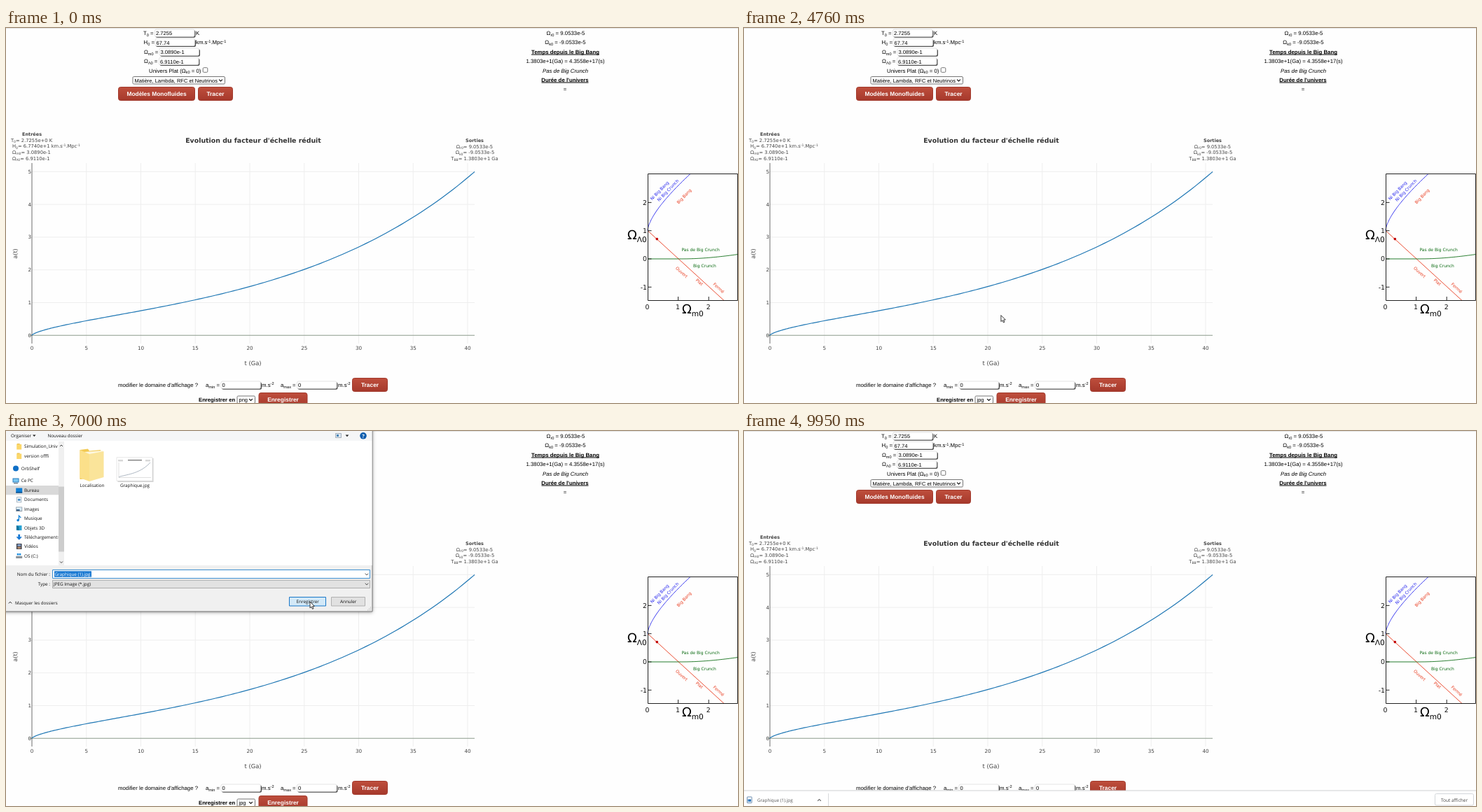
Recreate the animation shown at these times as an HTML page with a canvas. Size 1045 px wide and 536 px high, loop 9.99 s.

```html
<!DOCTYPE html>
<html lang="fr">
<head>
<meta charset="utf-8">
<title>Facteur d'échelle</title>
<style>
html, body { margin: 0; width: 100%; height: 100%; overflow: hidden; background: #fefefe; }
canvas { display: block; width: 1045px; height: 536px; }
</style>
</head>
<body>
<canvas id="stage" width="1045" height="536"></canvas>
<script>
const W = 1045, H = 536, LOOP = 9990;
const ctx = document.getElementById('stage').getContext('2d');
const ARIAL = '"Liberation Sans", Arial, sans-serif';
const DEJA = '"DejaVu Sans", Verdana, sans-serif';
const OPEN = '"Open Sans", sans-serif';
const clamp = v => Math.max(0, Math.min(1, v));

// ---- helpers ----
// y is the middle of the capitals; _{..} is a subscript, ^{..} a superscript
function text(str, x, y, { size = 7.8, font = ARIAL, style = '', align = 'left', color = '#000', sub = .72 } = {}) {
  const parts = str.split(/([_^]\{[^}]*\})/).filter(Boolean).map(p => {
    const m = /^([_^])\{(.*)\}$/.exec(p);
    return { s: m ? m[2] : p, size: m ? size * sub : size, dy: !m ? 0 : m[1] === '_' ? size * .2 : -size * .36 };
  });
  const use = p => { ctx.font = `${style} ${p.size}px ${font}`; };
  let total = 0;
  for (const p of parts) { use(p); total += p.w = ctx.measureText(p.s).width; }
  if (align === 'center') x -= total / 2;
  if (align === 'right') x -= total;
  ctx.fillStyle = color;
  for (const p of parts) { use(p); ctx.fillText(p.s, x, y + size * .36 + p.dy); x += p.w; }
  return total;
}
function rect(x, y, w, h, fill, stroke, r = 0, lw = 1) {
  ctx.beginPath();
  ctx.roundRect(x, y, w, h, r);
  if (fill) { ctx.fillStyle = fill; ctx.fill(); }
  if (stroke) { ctx.strokeStyle = stroke; ctx.lineWidth = lw; ctx.stroke(); }
}
function path(points, color, lw = 1) {
  ctx.beginPath();
  points.forEach(([x, y]) => ctx.lineTo(x, y));
  ctx.strokeStyle = color; ctx.lineWidth = lw; ctx.stroke();
}
function poly(points, color) {
  ctx.beginPath();
  points.forEach(([x, y]) => ctx.lineTo(x, y));
  ctx.fillStyle = color; ctx.fill();
}
function disc(x, y, r, color) {
  ctx.beginPath(); ctx.arc(x, y, r, 0, 7); ctx.fillStyle = color; ctx.fill();
}
const curve = (n, f) => Array.from({ length: n + 1 }, (_, i) => f(i / n));
const chevron = (x, y, s, color, lw = 1) => path([[x - Math.abs(s), y - s / 2], [x, y + s / 2], [x + Math.abs(s), y - s / 2]], color, lw);
function turned(str, x, y, deg, opts) {
  ctx.save(); ctx.translate(x, y); ctx.rotate(deg * Math.PI / 180);
  text(str, 0, 0, { align: 'center', ...opts });
  ctx.restore();
}

// ---- page form ----
function input(x, y, value) {
  rect(x + 1, y + 1.2, 57, 10.6, '#4a4a4a', null, 2.5);
  rect(x, y, 56.6, 10.4, '#fff', '#c9c9c9', 2, .5);
  text(value, x + 1.5, y + 5.6, { size: 7.6 });
}
function button(x, y, w, label, hover) {
  const g = ctx.createLinearGradient(0, y, 0, y + 20);
  g.addColorStop(0, hover ? '#c95a47' : '#bf4f3d');
  g.addColorStop(1, hover ? '#b04033' : '#a5382b');
  rect(x + .5, y + .5, w - 1, 19, g, '#a2392c', 3);
  text(label, x + w / 2, y + 10.3, { size: 8.4, style: 'bold', align: 'center', color: '#fff' });
}
function select(x, y, w, value, focused) {
  rect(x + .5, y + .5, w - 1, 10.5, '#fff', focused ? '#222' : '#767676', 1.5);
  text(value, x + 3, y + 6, { size: 7.5 });
  chevron(x + w - 6.5, y + 5.8, 2.4, '#111', 1.2);
}
function form(t) {
  rect(0, 0, W, 1, '#e4e4e4');
  text('T_{0} =', 196, 7.3); input(212.5, 2, '2.7255'); text('K', 271, 7.3);
  text('H_{0} =', 196.5, 20.5); input(213, 15.3, '67.74'); text('km.s^{-1}.Mpc^{-1}', 271, 20.5);
  text('Ω_{m0} =', 197, 34.5); input(219, 29, '3.0890e-1');
  text('Ω_{Λ0} =', 197, 47.5); input(218.5, 42.3, '6.9110e-1');
  text('Univers Plat (Ω_{k0} = 0)', 204, 60.8);
  rect(281.2, 56.7, 6.6, 6.6, '#fff', '#767676', 1.2);
  select(180.5, 69, 132.5, 'Matière, Lambda, RFC et Neutrinos');
  button(160, 84, 110, 'Modèles Monofluides');
  button(274, 84, 50, 'Tracer');

  const mid = { align: 'center' }, head = { align: 'center', style: 'bold' };
  text('Ω_{r0} = 9.0533e-5', 799, 7.3, mid);
  text('Ω_{k0} = -9.0533e-5', 798.5, 20.5, mid);
  text('Temps depuis le Big Bang', 798.5, 34, head);
  rect(750, 37.6, 97, .9, '#000');
  text('1.3803e+1(Ga) = 4.3558e+17(s)', 798.5, 47.5, mid);
  text('Pas de Big Crunch', 798.5, 61, { align: 'center', style: 'italic' });
  text("Durée de l'univers", 798, 74, head);
  rect(764.5, 77.6, 67, .9, '#000');
  text('=', 798, 87, mid);

  text("modifier le domaine d'affichage ?", 160, 510.3);
  text('a_{min} =', 285, 510.3); input(307, 505, '0'); text('m.s^{-2}', 365, 510.3);
  text('a_{max} =', 392, 510.3); input(415.5, 505, '0'); text('m.s^{-2}', 474, 510.3);
  button(494, 500, 51, 'Tracer');
  text('Enregistrer en', 275, 531.3, { size: 7.7, style: 'bold' });
  select(329.5, 525.5, 26.5, t < 2990 ? 'png' : 'jpg', t > 1700 && t < 3800);
  button(360.5, 521, 70, 'Enregistrer', t > 3350 && t < 4480);
}

// ---- scale factor chart ----
const px = t => 37 + t * 15.55, py = a => 439.3 - a * 46.8;
const scaleFactor = t => Math.cbrt(.3089 / .6911) * Math.sinh(.08636 * t) ** (2 / 3);
function chart() {
  const grey = { font: DEJA, color: '#444' };
  const note = { ...grey, size: 6.75, sub: .68 }, centred = { ...note, align: 'center' };
  for (let k = 5; k <= 40; k += 5) path([[px(k), 193], [px(k), 451]], '#eee');
  for (let k = 1; k <= 5; k++) path([[37, py(k)], [669, py(k)]], '#eee');
  path([[33, py(0)], [669, py(0)]], '#8b9a8b', 1.1);
  path([[37, 193], [37, 451]], '#6c6c6c', 1);
  for (let k = 0; k <= 40; k += 5) text('' + k, px(k), 457.3, { ...grey, size: 7.2, align: 'center' });
  for (let k = 0; k <= 5; k++) text('' + k, 36, py(k), { ...grey, size: 7.2, align: 'right' });
  path(curve(160, u => { const t = 40.65 * u * u; return [px(t), py(scaleFactor(t))]; }), '#1f77b4', 1.2);

  text("Evolution du facteur d'échelle réduit", 353, 161, { ...grey, size: 9.4, style: 'bold', align: 'center', color: '#333' });
  text('t (Ga)', 352.5, 478.6, { ...grey, size: 8.4, align: 'center' });
  turned('a(t)', 13.2, 322.5, -90, { ...grey, size: 8.2 });
  text('Entrées', 37, 151.7, { ...centred, size: 6.5, style: 'bold' });
  text('T_{0}= 2.7255e+0 K', 7, 160.3, note);
  text('H_{0}= 6.7740e+1 km.s^{-1}.Mpc^{-1}', 9, 168.8, note);
  text('Ω_{m0}= 3.0890e-1', 9, 177.6, note);
  text('Ω_{Λ0}= 6.9110e-1', 9, 186.3, note);
  text('Sorties', 669, 160.3, { ...centred, size: 6.5, style: 'bold' });
  text('Ω_{r0}= 9.0533e-5', 669, 169.3, centred);
  text('Ω_{k0}= -9.0533e-5', 669.5, 177.8, centred);
  text('T_{BB}= 1.3803e+1 Ga', 669, 186.6, centred);
}
function modebar(alpha) {
  if (alpha <= 0) return;
  ctx.save();
  ctx.globalAlpha = alpha;
  const pale = '#dfe1e4', y = 143.7;
  rect(567.5, y - 2.5, 8, 6, pale, null, 1); disc(571.5, y + .5, 1.6, '#fff');
  ctx.beginPath(); ctx.arc(588.7, y - .6, 2.6, 0, 7); ctx.strokeStyle = '#a9abae'; ctx.lineWidth = 1.5; ctx.stroke();
  path([[590.6, y + 1.4], [593, y + 3.8]], '#a9abae', 1.6);
  path([[599, y], [607, y]], pale, 1.2); path([[603, y - 4], [603, y + 4]], pale, 1.2);
  for (const x of [621, 634]) {
    rect(x - 4, y - 3.8, 8, 7.6, pale);
    rect(x - 2, y - .5, 4, 1, '#fff');
    if (x === 621) rect(x - .5, y - 2, 1, 4, '#fff');
  }
  path([[644, y - 4], [652, y + 4]], pale); path([[652, y - 4], [644, y + 4]], pale);
  poly([[656.5, y], [661, y - 4], [665.5, y], [664, y], [664, y + 4], [658, y + 4], [658, y]], pale);
  path([[674, y + 2], [674, y - 2.5], [681, y - 2.5]], pale);
  rect(688, y - 2, 8, 4, '#d2d4d7', null, 1);
  rect(702, y - 3.5, 8.5, 3, '#bbbdc0'); rect(702, y + .8, 8.5, 3, '#bbbdc0');
  ctx.restore();
}

// ---- model plane ----
const mx = m => 916 + m * 43.6, my = l => 330 - l * 40.3;
function plane() {
  const blue = '#2222ee', red = '#e8391c', green = '#0b6b12', lab = { font: DEJA, size: 6 };
  path(curve(80, u => {
    const m = 1.4 * u * u + 1e-6, q = (1 - m) / m;
    const c = q >= 1 ? Math.cosh(Math.acosh(q) / 3) : Math.cos(Math.acos(q) / 3);
    return [mx(m), my(4 * m * c ** 3)];
  }), blue, .9);
  path([[916, 289.6], [1025, 389.5]], red, .9);
  path([[916, 330], ...curve(50, u => {
    const m = 1 + 1.95 * u;
    return [mx(m), my(4 * m * Math.cos(Math.acos((1 - m) / m) / 3 + 4 * Math.PI / 3) ** 3)];
  })], green, .9);
  rect(916.5, 208.5, 128, 181, null, '#222');
  disc(929.3, 301.6, 1.8, '#c00000');
  const tick = { font: DEJA, size: 9.4, align: 'center', color: '#111' };
  for (const k of [-1, 0, 1, 2]) {
    path([[916, my(k)], [921.5, my(k)]], '#222');
    text('' + k, 915, my(k), { ...tick, align: 'right' });
  }
  for (const k of [0, 1, 2]) {
    if (k) path([[mx(k), 384], [mx(k), 389]], '#222');
    text('' + k, mx(k) - .5, 398.3, tick);
  }
  const big = { font: DEJA, size: 18, sub: .59 };
  text('Ω_{Λ0}', 887, 295.5, big);
  text('Ω_{m0}', 965, 401.5, big);
  turned('Ni Big Bang', 933, 232.5, -46, { ...lab, color: blue });
  turned('Ni Big Crunch', 945, 232, -46, { ...lab, color: blue });
  turned('Big Bang', 968, 240.5, -46, { ...lab, color: red });
  turned('Ouvert', 964.5, 349, 42, { ...lab, color: red });
  turned('Plat', 990, 363.2, 42, { ...lab, color: red });
  turned('Fermé', 1017.5, 371.5, 42, { ...lab, color: red });
  text('Pas de Big Crunch', 964.5, 317.3, { ...lab, color: green });
  text('Big Crunch', 981, 339.5, { ...lab, color: green });
}

// ---- format list ----
function formatList(cursorY) {
  rect(329.5, 497, 26, 28.5, '#fff', '#555');
  const picked = Math.max(0, Math.min(2, Math.floor((cursorY - 497.5) / 9.2)));
  ['png', 'jpg', 'svg'].forEach((name, i) => {
    const y = 497.6 + i * 9.2;
    if (i === picked) rect(330.2, y, 24.8, 9.2, '#1e78d7');
    text(name, 332.5, y + 4.6, { size: 7.5, color: i === picked ? '#fff' : '#000' });
  });
}

// ---- save dialog ----
const ui = { font: OPEN, size: 6.35, color: '#111' };
function smallIcon(kind, x, y) {
  const bar = (dx, dy, w, h, c) => rect(x + dx, y + dy, w, h, c);
  const kinds = {
    folder() { bar(-3, -4, 4, 2, '#e9bb45'); bar(-3.5, -3, 7, 7.5, '#fbd76b'); },
    cloud() { disc(x, y, 4, '#0f6fc6'); },
    pc() { bar(-4.5, -3.5, 9, 6, '#2b7fc0'); bar(-3.5, -2.5, 7, 4, '#7cc8f2'); bar(-3, 3.2, 6, 1, '#456'); },
    desk() { bar(-4.5, -3.5, 9, 7, '#0f7fd6'); bar(-4.5, 2, 9, 1.5, '#0a4f8d'); },
    doc() { bar(-3.5, -4, 7, 8, '#8fa3b3'); bar(-2.7, -3.2, 5.4, 6.4, '#fff'); bar(-1.8, -1.5, 3.6, 3, '#4a90c8'); },
    image() { bar(-4.5, -3, 9, 6.4, '#8b97a2'); bar(-3.7, -2.2, 7.4, 4.8, '#d8ecf8'); bar(-3.7, .4, 4.6, 2.2, '#36618a'); },
    music() { path([[x - .3, y + 2.5], [x - .3, y - 4], [x + 2.6, y - 1]], '#1683d8', 1.3); disc(x - 1.6, y + 2.6, 1.8, '#1683d8'); },
    cube() { bar(-3.8, -3.4, 7.6, 7, '#2aa3d4'); poly([[x - 3.8, y - 3.4], [x, y - 1.4], [x, y + 4], [x - 3.8, y + 3]], '#13749e'); },
    down() { bar(-1.4, -4, 2.8, 4, '#1477d4'); poly([[x - 4.2, y - .4], [x + 4.2, y - .4], [x, y + 4]], '#1477d4'); },
    video() { bar(-3.8, -4, 7.6, 8, '#3a3f4a'); bar(-2.4, -3, 4.8, 2.6, '#8aa9d6'); bar(-2.4, .6, 4.8, 2.6, '#b58a6a'); },
    disk() { bar(-4.5, .2, 9, 3.2, '#8d949a'); bar(-3, -3.6, 2.6, 2.6, '#1d8fe0'); bar(0, -3.6, 2.6, 2.6, '#1d8fe0'); }
  };
  kinds[kind]();
}
function dialog(ready, hover, pressed) {
  ctx.save();
  ctx.shadowColor = 'rgba(0,0,0,.45)'; ctx.shadowBlur = 5; ctx.shadowOffsetY = 1;
  rect(-5, -5, 528, 263, '#f0f0f0');
  ctx.restore();
  rect(-2, -2, 525, 260, null, '#777');
  rect(0, 0, 522.5, 14, '#f5f6f7');
  rect(0, 14, 522.5, 178, '#fff');

  rect(0, 78, 75, 13.2, '#d9d9d9');
  const rows = [
    ['folder', 'Simulation_Univ', 22, 1], ['folder', 'version offfi', 35.5, 1], ['cloud', 'OrbShelf', 53.5, 0],
    ['pc', 'Ce PC', 71, 0], ['desk', 'Bureau', 85, 1], ['doc', 'Documents', 98.2, 1], ['image', 'Images', 111.5, 1],
    ['music', 'Musique', 125, 1], ['cube', 'Objets 3D', 138.3, 1], ['down', 'Téléchargements', 151.7, 1],
    ['video', 'Vidéos', 165, 1], ['disk', 'OS (C:)', 178.5, 1]];
  ctx.save();
  ctx.beginPath(); ctx.rect(0, 14, 74.5, 178); ctx.clip();
  for (const [icon, name, y, inner] of rows) {
    smallIcon(icon, inner ? 18.7 : 14, y);
    text(name, inner ? 26 : 21.8, y, ui);
  }
  ctx.restore();
  rect(75, 15, 8, 177, '#f0f0f0');
  rect(75, 79.5, 8, 93, '#cdcdcd');
  chevron(79, 21, -2, '#444'); chevron(79, 187.5, 2, '#444');

  poly([[105.5, 27], [117, 25.5], [119, 28.5], [135, 27], [135, 66], [105.5, 69]], '#f2c953');
  if (ready) poly([[111, 30], [138, 28], [138, 66], [114, 69]], '#fdf6dc');
  poly([[105.5, 27], [119, 33], [119, 72], [105.5, 67]], '#fbe08a');
  poly([[119, 33], [139.5, 29], [139.5, 66], [119, 72]], ready ? '#fae49a' : '#f7d467');
  text('Localisation', 123, 78, { ...ui, align: 'center' });
  rect(159.5, 39, 51, 34, '#d2d2d2');
  rect(158, 37.7, 51, 33.5, '#fff', '#ddd', 0, .7);
  rect(174, 41, 20, 1.3, '#777');
  rect(160, 41, 7, 2.5, '#d8d8d8'); rect(199, 41, 7, 2.5, '#d8d8d8');
  path([[161, 45], [161, 66.5], [207, 66.5]], '#ccc', .6);
  path(curve(30, u => [161 + 45 * u, 66 - 4.2 * scaleFactor(40.65 * u)]), '#8a98a8', .7);
  text('Graphique.jpg', 184, 78, { ...ui, align: 'center' });

  disc(510, 6.8, 4.8, '#0b5cad');
  text('?', 510, 7, { ...ui, size: 7.5, style: 'bold', align: 'center', color: '#fff' });

  text('Nom du fichier :', 63, 204.8, { ...ui, align: 'right' });
  text('Type :', 63, 218.8, { ...ui, align: 'right' });
  rect(66.5, 198.5, 453, 12, '#fff', '#3d8fd1');
  rect(69, 200.2, 53, 8.6, '#1979d2');
  text('Graphique (1).jpg', 69.5, 204.6, { ...ui, color: '#fff' });
  rect(66.5, 213.3, 453, 11.2, '#e2e2e2', '#adadad');
  text('JPEG Image (*.jpg)', 68, 218.8, ui);
  chevron(515, 204.8, 2.2, '#444'); chevron(515, 218.8, 2.2, '#444');

  if (!ready) {
    rect(2, 239, 83, 11.5, '#fff'); rect(404, 237, 53.5, 13.5, '#fff'); rect(464, 237, 49, 13.5, '#fff');
    return;
  }
  text('Organiser', 7, 6.8, ui); poly([[38, 5.6], [42.6, 5.6], [40.3, 8]], '#222');
  text('Nouveau dossier', 59.5, 6.8, ui);
  rect(470.5, 3.5, 8, 6, '#dfe7ef', '#8796a5', 0, .7); rect(472, 5, 3, 3, '#4a86b8');
  poly([[484.6, 5.6], [489.4, 5.6], [487, 8.2]], '#222');
  chevron(6, 245.3, -2.2, '#222');
  text('Masquer les dossiers', 13, 245.3, { ...ui, size: 6.2 });
  rect(404.5, 237.5, 52, 12.5, pressed ? '#b5d8f0' : hover ? '#d3e9f8' : '#e1e1e1', '#1a78c8');
  text('Enregistrer', 430.7, 243.8, { ...ui, align: 'center' });
  rect(464.5, 237.5, 48, 12.5, '#e1e1e1', '#b0b0b0');
  text('Annuler', 488.7, 243.8, { ...ui, align: 'center' });
  for (let i = 0; i < 3; i++) for (let j = 0; j <= i; j++) rect(520 - j * 2, 251.5 + i * 2, 1, 1, '#b5b5b5');
}

// ---- download bar ----
function downloadBar(t, cursor) {
  const shift = 22 * (1 - clamp((t - 7200) / 200));
  if (shift >= 22) return;
  ctx.save();
  ctx.translate(0, shift);
  rect(0, 514, W, 24, '#fff');
  rect(0, 513.6, W, .9, '#cfd1d4');
  const pulse = t < 9930 ? .35 * Math.abs(Math.sin((t - 7400) / 380)) : 0;
  disc(8, 527.5, 7, `rgba(66,133,244,${pulse})`);
  rect(4.5, 523, 6.6, 8.6, '#fff', '#5b7fa6', .5, .9);
  rect(5.6, 526.4, 4.4, 3.4, '#2f78bd');
  text('Graphique (1).jpg', 19, 527.8, { ...ui, size: 6.3, color: '#555' });
  chevron(107.5, 527.6, -2.3, '#666', 1.1);
  rect(120, 518, .9, 18, '#d4d6d9');
  const over = cursor && cursor[0] > 986 && cursor[1] > 517;
  rect(986.5, 518.5, 55, 16.5, over ? '#f1f3f4' : '#fff', '#d3d6da', 2);
  text('Tout afficher', 1014, 527.2, { ...ui, size: 6.5, align: 'center', color: '#444' });
  ctx.restore();
}

// ---- pointer ----
const track = [
  [30, 968, 530], [260, 745, 437], [720, 745, 437], [1100, 560, 470], [1670, 347, 529], [1850, 347, 529],
  [2150, 343, 508], [2470, 345, 518], [2650, 345, 518], [2790, 344, 512], [2940, 344, 512], [3450, 398, 527],
  [4430, 398, 527], [4760, 367, 411], [5050, 338, 301], [5410, 110, 214], [5480, 110, 212], [6030, 434, 244],
  [7100, 434, 244], [7570, 560, 330], [8190, 792, 455], [8600, 956, 519], [8700, 958, 520], [9150, 1012, 525],
  [9400, 1016, 525], [9630, 1024, 540]];
function cursorAt(t) {
  const i = track.findIndex(k => k[0] > t);
  if (i < 1) return null;
  const [t0, x0, y0] = track[i - 1], [t1, x1, y1] = track[i];
  const u = (t - t0) / (t1 - t0);
  return [x0 + (x1 - x0) * u, y0 + (y1 - y0) * u];
}
function pointer([x, y]) {
  ctx.beginPath();
  for (const [dx, dy] of [[0, 0], [0, 9], [2, 7.2], [3.5, 10.4], [5, 9.7], [3.6, 6.6], [6.4, 6.4]]) ctx.lineTo(x + dx, y + dy);
  ctx.closePath();
  ctx.fillStyle = '#fff'; ctx.fill();
  ctx.strokeStyle = '#222'; ctx.lineWidth = .9; ctx.stroke();
}

const fade = (t, start, end) => Math.min(clamp((t - start) / 150), clamp((end - t) / 200));

function draw(t) {
  const cursor = cursorAt(t);
  ctx.textRendering = 'geometricPrecision';
  rect(0, 0, W, H, '#fefefe');
  form(t);
  chart();
  modebar(Math.max(fade(t, 800, 1600), fade(t, 7250, 8450)));
  plane();
  if (t >= 1740 && t < 2990) formatList(t < 1850 ? 500 : cursor[1]);
  if (t >= 4920 && t < 7050) dialog(t >= 5100, t > 5980, t > 6580 && t < 6720);
  downloadBar(t, cursor);
  if (cursor) pointer(cursor);
}
function loop() {
  draw(performance.now() % LOOP);
  requestAnimationFrame(loop);
}
loop();
</script>
</body>
</html>
```
